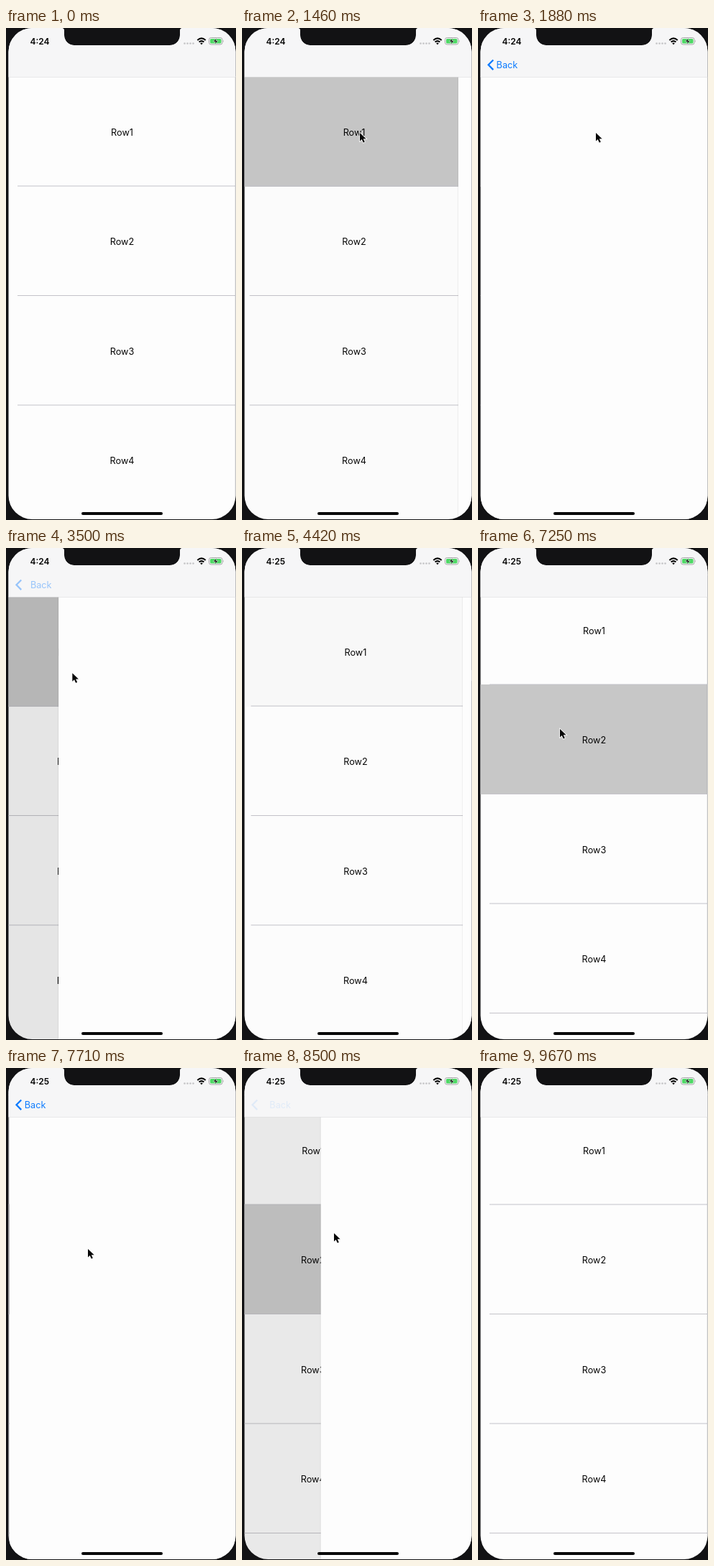
Animation, 320 px wide and 685 px high, one loop 9.75 s. Source, as an HTML page:

```html
<!DOCTYPE html>
<html lang="en">
<head>
<meta charset="utf-8">
<title>Swipe back list</title>
<style>
  html, body { margin: 0; width: 100%; height: 100%; overflow: hidden; background: #121214; }
  svg { display: block; width: 320px; height: 685px; }
  text { font: 12.7px Inter, sans-serif; fill: #060606; }
  #clock { font-size: 12px; font-weight: 600; }
  #back text { fill: #0a7aff; }
</style>
</head>
<body>
<svg viewBox="0 0 320 685">
  <clipPath id="screen">
    <path d="M36.500 0H77q4 0 4 4v6a14 14 0 0 0 14 14h133a14 14 0 0 0 14-14V4q0-4 4-4h40.500a33 33 0 0 1 33 33v618a33 33 0 0 1-33 33h-250a33 33 0 0 1-33-33V33a33 33 0 0 1 33-33z"/>
  </clipPath>
  <g clip-path="url(#screen)">
    <rect width="320" height="685" fill="#fdfdfd"/>
    <g id="list">
      <rect id="selected" x="3" width="317" height="153" fill="#c7c7c7"/>
    </g>
    <rect id="dim" width="320" height="685"/>
    <g id="detail">
      <rect x="-1" y="68" width="1" height="617" opacity=".06"/>
      <rect y="68" width="320" height="617" fill="#fdfdfd"/>
    </g>
    <rect width="320" height="68" fill="#f6f6f7"/>
    <rect y="68" width="320" height=".6" fill="#dcdcde"/>
    <g id="back">
      <path d="M21.200 44.500l-6.700 6.800 6.700 6.800" fill="none" stroke="#0a7aff" stroke-width="2.300"/>
      <text id="backLabel" y="56">Back</text>
    </g>
    <text id="clock" x="33.500" y="22.500"></text>
    <g fill="#c4c4c6">
      <circle cx="248.500" cy="21.500" r="1.300"/><circle cx="252.500" cy="21.500" r="1.300"/>
      <circle cx="256.500" cy="21.500" r="1.300"/><circle cx="260.500" cy="21.500" r="1.300"/>
    </g>
    <g fill="none" stroke="#060606" stroke-width="2">
      <path d="M266.300 17q5.700-5.200 11.400 0M268.600 19.600q3.400-3 6.800 0"/>
      <path d="M270.200 21.300q1.800-1.400 3.600 0l-1.800 1.900z" fill="#060606" stroke="none"/>
    </g>
    <rect x="282.500" y="13.500" width="18.500" height="9.500" rx="2.800" fill="none" stroke="#a6a6a8"/>
    <rect x="284" y="15" width="15.500" height="6.500" rx="1.500" fill="#4cd964"/>
    <path d="M302 16.500q1.500 1.700 0 3.500z" fill="#a6a6a8"/>
    <path d="M293 13.800l-4.600 5.200h3l-1 4 4.600-5.200h-3z" fill="#060606" stroke="#fdfdfd" stroke-width=".5"/>
    <rect x="105" y="674" width="113" height="4" rx="2" fill="#060606"/>
  </g>
  <path id="cursor" d="M0 0v11.500l2.700-2.500 2 4.600 2.100-.9-2-4.500h3.800z" fill="#060606" stroke="#fdfdfd" stroke-width="1.600" paint-order="stroke"/>
</svg>
<script>
const LOOP = 9750, WIDTH = 316, TOP = 68, ROW = 152.5, SCROLL = 30;
const $ = id => document.getElementById(id);

const visits = [
  { row: 0, press: 1330, push: 1440, drag: 3017, end: 4606 },
  { row: 1, press: 7180, push: 7315, drag: 8150, end: 9050 }
];

// Pointer stops: time, x, y
const stops = [
  [240, 332, 200], [1250, 164, 146], [1950, 164, 146], [2950, 24, 175],
  [3017, 24, 175], [4606, 332, 171.5], [4700, 332, 171.5], [6040, 122, 288],
  [6250, 122, 288], [6750, 114, 252], [7740, 114, 252], [8120, 24, 232],
  [8150, 24, 232], [9050, 332, 226]
];

const smooth = (t, from, to) => {
  const u = Math.min(1, Math.max(0, (t - from) / (to - from)));
  return u * u * (3 - 2 * u);
};

function pointer(t) {
  let [, x, y] = stops[0];
  for (let i = 1; i < stops.length; i++) {
    const [from, x0, y0] = stops[i - 1], [to, x1, y1] = stops[i];
    const u = smooth(t, from, to);
    x += (x1 - x0) * u;
    y += (y1 - y0) * u;
  }
  return [x, y];
}

// 1 shows the list, 0 shows the detail page
function listShare(t) {
  const visit = visits.find(v => t >= v.push && t < v.end);
  if (!visit) return 1;
  if (t >= visit.drag) return smooth(t, visit.drag, visit.end);
  const s = (t - visit.push) * 0.01826;
  return (1 + s) * Math.exp(-s);
}

// Selected row and its strength, which fades while swiping back
function selection(t, share) {
  const visit = visits.find(v => t >= v.press && t < v.end);
  if (visit) return [visit.row, t >= visit.drag ? 1 - share * share : 1];
  return [1, t >= 6080 && t < 6290 ? 1 : 0];
}

for (let i = 0; i < 5; i++) {
  const y = TOP + i * ROW;
  $('list').insertAdjacentHTML('beforeend',
    `<g id="row${i}">
      <text x="161.500" y="${y + 81.5}" text-anchor="middle">Row${i + 1}</text>
      <rect x="16" y="${y - 1}" width="304" height="1" fill="#c4c3c9"/>
    </g>`);
}

const move = (id, x, y) => $(id).setAttribute('transform', `translate(${x} ${y})`);
const fade = (id, opacity) => $(id).setAttribute('opacity', opacity);

function draw() {
  const t = performance.now() % LOOP;
  const share = listShare(t);
  const [row, strength] = selection(t, share);
  const scrolled = smooth(t, 6290, 6750);
  move('list', -0.3 * WIDTH * (1 - share), -SCROLL * scrolled);
  move('detail', 3 + WIDTH * share, 0);
  move('cursor', ...pointer(t));
  fade('dim', 0.12 * (1 - share));
  fade('row4', scrolled ? 1 : 0);
  $('selected').setAttribute('y', TOP + row * ROW - (row ? 0.5 : 0));
  fade('selected', strength);
  fade('back', Math.max(0, 1 - 2.7 * share));
  $('backLabel').setAttribute('x', 25.5 + 38 * share);
  $('clock').textContent = t < 4000 ? '4:24' : '4:25';
  requestAnimationFrame(draw);
}
draw();
</script>
</body>
</html>
```
